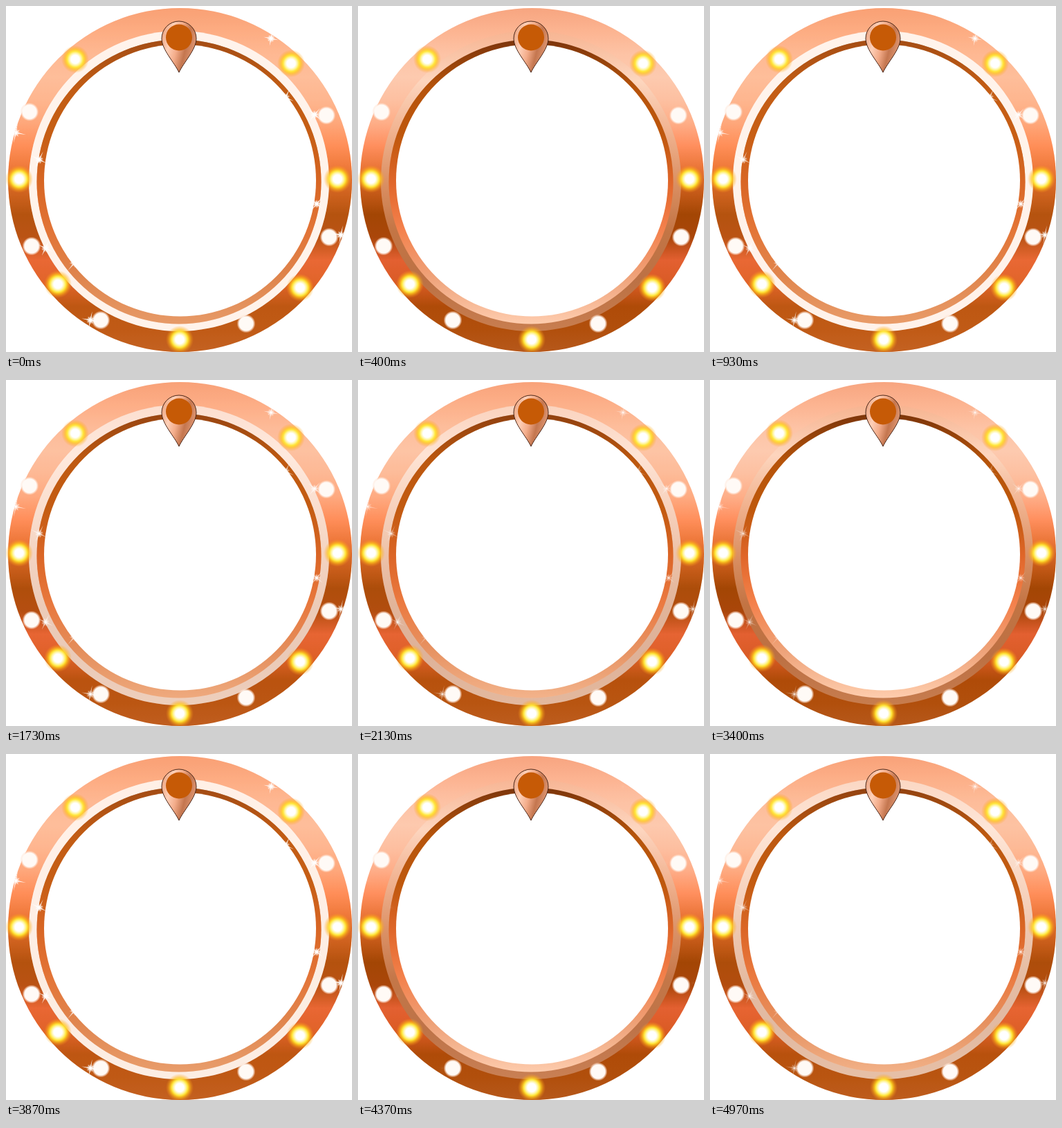
These frames come from a looping animation (500x500 px, 5010 ms). An HTML page with a canvas:

```html
<!DOCTYPE html>
<html lang="en">
<head>
<meta charset="utf-8">
<title>Wheel frame with lights</title>
<style>
html, body { margin: 0; width: 100%; height: 100%; overflow: hidden; background: #fff; }
canvas { display: block; }
</style>
</head>
<body>
<canvas id="stage" width="500" height="500"></canvas>
<script>
const ctx = document.getElementById('stage').getContext('2d');
const LOOP = 5010;
const GLOW_PERIOD = 952;
const SPARKLE_PERIOD = 789;

const yellowBulbs = [[100, 77], [412, 83], [19, 250], [479, 250], [75, 402], [425, 407], [251, 482]];
const whiteBulbs = [[34, 153], [463, 158], [467, 334], [37, 347], [137, 454], [347, 459]];
const sparkles = [
  [383, 47], [404, 132], [446, 157], [14, 183], [48, 222],
  [449, 286], [484, 331], [57, 350], [99, 371], [122, 454]
];

// Eased fade from 1 to 0 and back
const pulse = (t, period) => (1 + Math.cos(2 * Math.PI * t / period)) / 2;

// Spreads the colours evenly over the gradient
function spread(gradient, colors) {
  colors.forEach((color, i) => gradient.addColorStop(i / (colors.length - 1), color));
  return gradient;
}

const vertical = (y0, y1, colors) => spread(ctx.createLinearGradient(0, y0, 0, y1), colors.split(' '));

function disc(x, y, r, fill) {
  ctx.beginPath();
  ctx.arc(x, y, r, 0, 7);
  ctx.fillStyle = fill;
  ctx.fill();
}

function glowDisc(x, y, inner, outer, colors) {
  disc(x, y, outer, spread(ctx.createRadialGradient(x, y, inner, x, y, outer), colors.split(' ')));
}

const drawRim = fill => disc(251.5, 251.5, 248.5, fill);
const drawGroove = fill => disc(250, 253, 217, fill);
const drawBevel = fill => disc(250, 254, 205.5, fill);

const rimFill = vertical(3, 500,
  '#f7a581 #fcb492 #fdc3a6 #fdcab0 #fdc0a2 #feae89 #ff8f5e #e97336 ' +
  '#c65a18 #a24503 #a94509 #e35f31 #d95a24 #ae4a07 #b04e0b #b5571a');
const grooveFill = vertical(36, 470, '#f6b08c #fdd3bb #f0ae8a #d98a5c #bf6c3a #b8683a #c47646');
const bevelFill = vertical(50, 459, '#7a340a #b5530a #bd570c #e0662a #f5824e #efa47c #ffcfb2');
const pinFill = spread(ctx.createLinearGradient(226, 42, 274, 54),
  ['#eda987', '#ffd0b8', '#f3ac8a', '#c4764f', '#dd9470']);

function drawPin() {
  ctx.beginPath();
  ctx.moveTo(250, 96);
  ctx.bezierCurveTo(243, 81, 225, 63, 225, 47);
  ctx.arc(250, 47, 25, Math.PI, 0);
  ctx.bezierCurveTo(275, 63, 257, 81, 250, 96);
  ctx.closePath();
  ctx.fillStyle = pinFill;
  ctx.fill();
  ctx.strokeStyle = '#4a2618';
  ctx.lineWidth = 1;
  ctx.stroke();
  disc(250, 45.5, 19, '#c65a06');
}

function drawSparkle([x, y], index) {
  const size = 11 + index * 3 % 5;
  ctx.save();
  ctx.translate(x, y);
  ctx.rotate(.2 + index % 3 * .25);
  glowDisc(0, 0, 0, 6, '#fff #ffffff90 #fff0');
  ctx.fillStyle = '#fff';
  for (let i = 0; i < 8; i++) {
    ctx.beginPath();
    ctx.moveTo(0, -.9);
    ctx.lineTo(i % 2 ? size / 2 : size, 0);
    ctx.lineTo(0, .9);
    ctx.fill();
    ctx.rotate(Math.PI / 4);
  }
  ctx.restore();
}

function draw(t) {
  const glow = pulse(t, GLOW_PERIOD);
  ctx.globalAlpha = 1;
  ctx.fillStyle = '#fff';
  ctx.fillRect(0, 0, 500, 500);

  drawRim(rimFill);
  ctx.globalAlpha = glow;
  drawRim('#ff8a4033');
  ctx.globalAlpha = 1;
  drawGroove(grooveFill);
  ctx.globalAlpha = glow;
  drawGroove('#fff3eb');
  ctx.globalAlpha = 1;
  drawBevel(bevelFill);
  ctx.globalAlpha = glow;
  drawBevel('#d0661f80');
  ctx.globalAlpha = 1;
  disc(251.5, 252, 196.5, '#fff');

  for (const [x, y] of yellowBulbs) {
    glowDisc(x, y, 6, 20, '#fff #fff6a8 #ffe63c #ffc818b0 #ffae1850 #ffa01800');
  }
  for (const [x, y] of whiteBulbs) glowDisc(x, y, 10, 13.5, '#fffaf6 #ffe9dc90 #ffd0b000');

  ctx.save();
  ctx.beginPath();
  ctx.arc(251.5, 251.5, 248.5, 0, 7);
  ctx.clip();
  ctx.globalAlpha = pulse(t, SPARKLE_PERIOD);
  sparkles.forEach(drawSparkle);
  ctx.restore();
  drawPin();
}

const start = performance.now();
function tick() {
  draw((performance.now() - start) % LOOP);
  requestAnimationFrame(tick);
}
tick();
</script>
</body>
</html>
```
